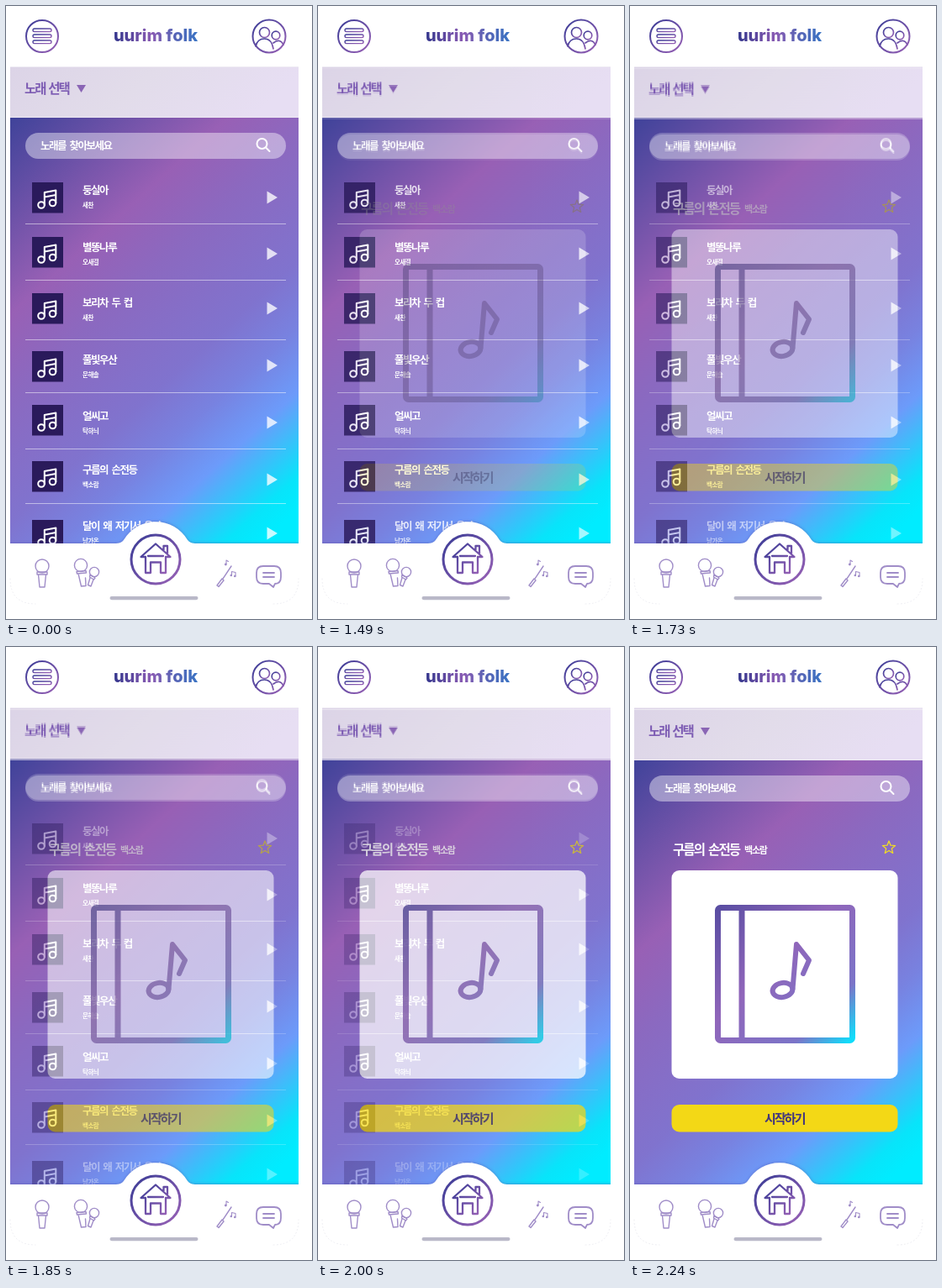
These frames come from a looping animation (364 by 730 pixels, 3570 ms). An HTML page:

```html
<!DOCTYPE html>
<html lang="ko">
<head>
<meta charset="utf-8">
<title>Song picker</title>
<style>
html, body { margin: 0; width: 100%; height: 100%; overflow: hidden; background: #fff; }
svg { display: block; width: 364px; height: 730px; }
text { font-family: "Noto Sans CJK KR", "Noto Sans CJK", sans-serif; font-weight: 700; fill: #fff; }
.row { font-size: 12.5px; letter-spacing: -1.45px; word-spacing: 2.2px; }
.by { font-size: 7.5px; letter-spacing: -.5px; }
.head { font-size: 15.5px; letter-spacing: -1.9px; word-spacing: 1px; fill: #7d5cb3; }
.song { font-size: 15.5px; letter-spacing: -1.9px; word-spacing: 2.6px; }
.singer { font-size: 11px; letter-spacing: -1.2px; }
.start { font-size: 15px; letter-spacing: -1.9px; fill: #41357f; }
.logo { font: 800 20px Inter, sans-serif; fill: url(#word); }
.line { fill: none; stroke-linecap: round; stroke-linejoin: round; }
</style>
</head>
<body>
<svg viewBox="0 0 364 730">
  <defs>
    <linearGradient id="bg" gradientUnits="userSpaceOnUse" x1="5" y1="135" x2="390" y2="560">
      <stop offset="0" stop-color="#40439a"/>
      <stop offset=".3" stop-color="#9860b5"/>
      <stop offset=".43" stop-color="#8b69c0"/>
      <stop offset=".62" stop-color="#8073ce"/>
      <stop offset=".72" stop-color="#7882e0"/>
      <stop offset=".82" stop-color="#6c9bfa"/>
      <stop offset=".95" stop-color="#08e4fa"/>
      <stop offset="1" stop-color="#00ecff"/>
    </linearGradient>
    <linearGradient id="bar" x2="1" y2=".2">
      <stop offset="0" stop-color="#dcd4e7"/>
      <stop offset=".5" stop-color="#e2dcea"/>
      <stop offset="1" stop-color="#e7def3"/>
    </linearGradient>
    <linearGradient id="word">
      <stop offset="0" stop-color="#33358c"/>
      <stop offset=".45" stop-color="#8a5cb4"/>
      <stop offset=".7" stop-color="#5a62b4"/>
      <stop offset="1" stop-color="#3b74c4"/>
    </linearGradient>
    <linearGradient id="ring" x2="1" y2="1">
      <stop offset="0" stop-color="#3a3c96"/>
      <stop offset="1" stop-color="#9a62b6"/>
    </linearGradient>
    <linearGradient id="album" gradientUnits="userSpaceOnUse" x1="101" y1="307" x2="268" y2="472">
      <stop offset="0" stop-color="#574ca1"/>
      <stop offset=".42" stop-color="#9066ba"/>
      <stop offset=".78" stop-color="#7b74c8"/>
      <stop offset=".97" stop-color="#10dcfa"/>
    </linearGradient>
    <filter id="glow" x="-10%" y="-20%" width="120%" height="140%">
      <feDropShadow dx="0" dy="-1" stdDeviation="1.5" flood-color="#5148a8" flood-opacity=".4"/>
    </filter>
    <clipPath id="screen"><path d="M5 0H348V713H5Z"/></clipPath>
  </defs>
  <rect width="364" height="730" fill="#fff"/>
  <g clip-path="url(#screen)">
    <g id="list"></g>
    <g id="detail"></g>
    <g id="ink"></g>
    <g filter="url(#glow)" fill="#fff">
      <path d="M0 640H131Q137 640 140 636A44 44 0 0 1 216 636Q219 640 225 640H360V730H0Z"/>
    </g>
  </g>
  <path class="line" d="M5 682Q5 712 35 712M318 712Q348 712 348 682" stroke="#ececf1" stroke-dasharray="1 3"/>

  <g class="line" stroke="url(#ring)" stroke-width="2">
    <circle cx="43" cy="36" r="19"/>
    <g stroke-width="1.4">
      <rect x="32" y="27" width="22" height="3.6" rx="1.8"/>
      <rect x="32" y="34" width="22" height="3.6" rx="1.8"/>
      <rect x="32" y="41" width="22" height="3.6" rx="1.8"/>
    </g>
    <circle cx="313" cy="36" r="19.5"/>
    <g stroke-width="1.7">
      <circle cx="307.5" cy="31.5" r="6"/>
      <circle cx="321" cy="35" r="4.8"/>
      <path d="M297 48Q299 39 307.500 39T318 51M318 44Q326 38 330 46"/>
    </g>
  </g>
  <text class="logo" x="178" y="42" text-anchor="middle">uurim folk</text>

  <g class="line" stroke="url(#ring)" stroke-width="2.3">
    <circle cx="178" cy="659" r="29" stroke-width="3"/>
    <path d="M166 656H160.500L178 640.500L195.500 656H190V675H184V662.500H172V675H166ZM169 655H187M187.500 648V643H192V652"/>
  </g>
  <g class="line" stroke="#a08dc8" stroke-width="1.4">
    <circle cx="43" cy="667" r="8"/>
    <path d="M37 674H49V677H37ZM38.5 677L40 692H46L47.5 677"/>
    <circle cx="89" cy="666" r="7.6"/>
    <path d="M84 673.5L95 672.5L95.5 675L84.5 676ZM86 676L89.5 691L95 690.5L94.5 681"/>
    <circle cx="105" cy="674" r="5.6"/>
    <path d="M100 677L106 681L104.5 683L99.5 680ZM100 681L97.5 689.5L101 691L104 683"/>
    <path d="M251 690L257 682L259 684L253 691.5ZM258 682L268 667"/>
    <path d="M262 665V660L264.5 661.5M268.5 678V673.5L273 674.5V679" stroke-width="1.1"/>
    <g fill="#a08dc8" stroke="none">
      <circle cx="261.3" cy="665" r="1.4"/><circle cx="267.8" cy="678" r="1.3"/><circle cx="272.2" cy="679" r="1.3"/>
    </g>
    <path d="M306 667H319Q327 667 327 675V680Q327 688 320 688L318 692L313 688H306Q298 688 298 680V675Q298 667 306 667ZM306 675H319M306 680H319" stroke-width="1.8"/>
  </g>
  <rect x="123.5" y="703" width="105" height="4.2" rx="2.1" fill="#b9b8c8"/>
</svg>
<script>
const $ = id => document.getElementById(id);

// Text placed by its left edge and vertical centre
const label = (cls, x, mid, size, str) =>
  `<text class="${cls}" x="${x}" y="${mid + size * 0.37}">${str}</text>`;

const frame = dy => `
  <rect x="5" y="${132 + dy}" width="343" height="520" fill="url(#bg)"/>
  <g transform="translate(0 ${dy})">
    <rect x="5" y="72" width="343" height="61" fill="url(#bar)"/>
    <path d="M5 72.5H348M5 132.5H348" stroke="#eeeaf3"/>
    ${label('head', 22, 98, 15.5, '노래 선택')}
    <path d="M84 94H95L89.5 103Z" fill="#8a65b5"/>
    <rect x="23" y="151" width="310" height="31" rx="15.5" fill="#fff" opacity=".42"/>
    ${label('row', 41, 166.5, 12.5, '노래를 찾아보세요')}
    <g class="line" stroke="#fff" stroke-width="2">
      <circle cx="304.5" cy="164" r="6"/><path d="M309 168.5L313.5 173"/>
    </g>
  </g>`;

// title, singer, thumb top, title middle, play middle, divider
const songs = [
  ['둥실아', '새찬', 210, 219, 228, 259.5],
  ['별똥나루', '오새결', 275, 287, 295, 326.5],
  ['보리차 두 컵', '새찬', 342, 353, 360, 397.5],
  ['풀빛우산', '문해솔', 411, 421, 428, 460.5],
  ['얼씨고', '탁하늬', 475, 488, 496, 527.5],
  ['구름의 손전등', '백소람', 542, 552, 564, 592.5],
  ['달이 왜 저기서 웃나', '남가온', 612, 619, 628, 660]
];

const row = ([title, singer, top, mid, play, end]) => `
  <g transform="translate(31 ${top})">
    <rect width="37" height="36.5" fill="#2a1a5b"/>
    <g class="line" stroke="#fff" stroke-width="2">
      <circle cx="11" cy="27" r="3.8"/><circle cx="24.5" cy="24.5" r="3.8"/>
      <path d="M14.8 27V12L28.3 9.5V24.5M14.8 17.5L28.3 15"/>
    </g>
  </g>
  ${label('row', 91, mid, 12.5, title)}
  ${label('by', 91, mid + 18.5, 7.5, singer)}
  <path d="M310.5 ${play - 7.5}L323 ${play}L310.5 ${play + 7.5}Z" fill="#fff" opacity=".78"/>
  <path d="M23 ${end}H333" stroke="#fff" stroke-width="1.2" opacity=".5"/>`;

const star = Array.from({ length: 10 }, (_, i) => {
  const r = i % 2 ? 3.5 : 8, a = (i / 5 - 0.5) * Math.PI;
  return `${(308 + r * Math.cos(a)).toFixed(2)},${(239 + r * Math.sin(a)).toFixed(2)}`;
}).join(' ');

$('list').innerHTML = frame(0) + songs.map(row).join('');
$('detail').innerHTML = frame(2) + `
  <rect x="49.5" y="266" width="269" height="248" rx="9" fill="#fff"/>
  <rect x="49.5" y="545" width="269" height="32.5" rx="9" fill="#f3d816"/>`;
$('ink').innerHTML = `
  ${label('song', 51, 241, 15.5, '구름의 손전등')}
  ${label('singer', 136, 242, 11, '백소람')}
  <polygon class="line" points="${star}" stroke="#f0dc23" stroke-width="1.3"/>
  <g class="line" stroke="url(#album)" stroke-width="7">
    <rect x="104.5" y="310.5" width="160" height="158" rx="3"/>
    <path d="M133 311V468" stroke-linecap="butt"/>
    <ellipse cx="181.5" cy="408.5" rx="12" ry="8.5" transform="rotate(-10 181.5 408.5)" stroke-width="6"/>
    <path d="M193.5 407L198 354L213 373L206 389" stroke-width="6"/>
  </g>
  ${label('start', 160, 561, 15, '시작하기')}`;

const clamp = v => Math.min(1, Math.max(0, v));
const LOOP = 3570, START = 1340, STEP = 30, STEPS = 30;

function draw(t) {
  const p = clamp(Math.floor((t - START) / STEP) / STEPS);
  $('detail').setAttribute('opacity', p);
  // Line work fades in early, dark at first
  $('ink').setAttribute('opacity', p ** 0.6);
  $('ink').style.filter = p < 1 ? `brightness(${p ** 0.32})` : 'none';
}

const begin = performance.now();
function tick() {
  draw((performance.now() - begin) % LOOP);
  requestAnimationFrame(tick);
}
tick();
</script>
</body>
</html>
```
